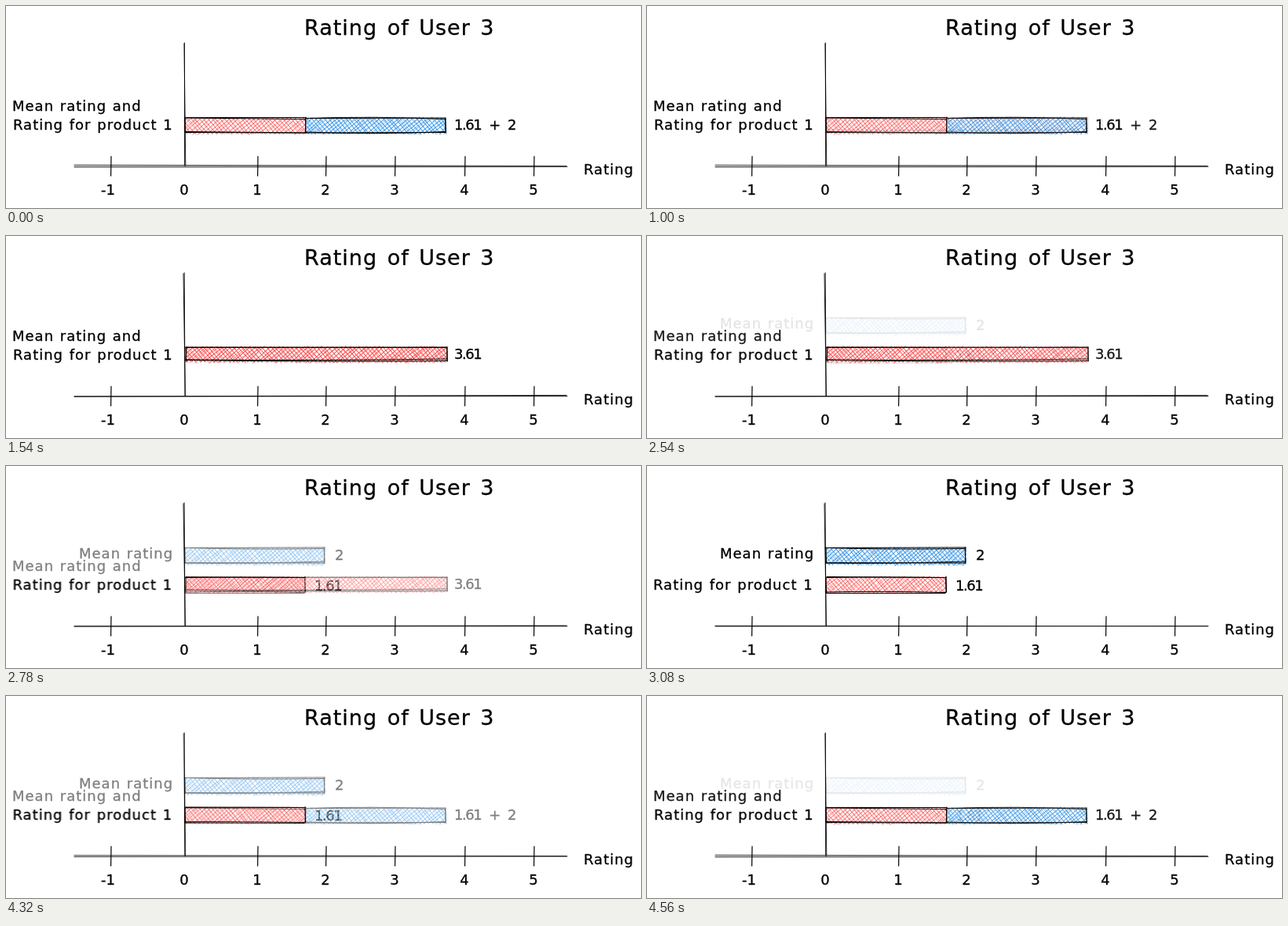
An HTML page with a canvas that plays this animation: 809 px wide and 258 px high, repeating every 4.62 s.

```html
<!DOCTYPE html>
<html lang="en">
<head>
<meta charset="utf-8">
<title>Rating of User 3</title>
<style>
  html, body { margin: 0; width: 100%; height: 100%; overflow: hidden; background: #fff; }
  canvas { display: block; }
</style>
</head>
<body>
<canvas id="stage" width="809" height="258"></canvas>
<script>
const WIDTH = 809, HEIGHT = 258;
const HOLD = 1000, STEP = 60, STEPS = 9, PERIOD = HOLD + STEP * STEPS;
const RED = '#fa5252', BLUE = '#228be6';

const TITLE = { size: 27, spacing: 1, words: 3 };
const LABEL = { size: 18, spacing: 1, words: 1 };
const VALUE = { size: 18, spacing: -1.5, words: 6 };
const TICK = { size: 18, spacing: 0, words: 0, align: 'center' };

const scenes = [
  {
    axes: 'M87 203.2L714 204.4M87 205.6L715 205.2M227 48L228.8 204M227.4 47L227.6 204',
    bars: [
      { box: [228, 143, 382, 163], color: RED, weight: 0.6 },
      { box: [382, 143, 560, 163], color: BLUE, weight: 0.65 }
    ],
    outline: 'M228 142.5L382 142.5M228 143L381 144.5M228 160.5L382 162M229 161.5L381 162' +
      'M228 142L228.5 161M382 142L381.4 162M381.4 143L382 162' +
      'M382 143.5Q470 140.5 560 144.5M382 143.5L560 143M560 143L560.4 162M559.6 144L560 161' +
      'M382 161Q470 164.5 560 160.5M382 162L560 161.5',
    labels: [['Mean rating and', 8, 134], ['Rating for product 1', 9, 158]],
    values: [['1.61 + 2', 571, 158]]
  },
  {
    axes: 'M87 205L714 203.4M87 205L715 204.6M226 48L228.4 204M227.2 47L228 204',
    bars: [{ box: [229, 142, 562, 161], color: RED, weight: 0.85 }],
    outline: 'M229 142.5L562 142M229 142L562 142.5M562 142L562.4 160M561.6 142L562 159' +
      'M229 158Q400 159.5 562 157M229 158.5Q390 161 562 159.5M229 142L229.5 160M230 142L229 159',
    labels: [['Mean rating and', 8, 134], ['Rating for product 1', 9, 158]],
    values: [['3.61', 571, 157]]
  },
  {
    axes: 'M87 204.2L714 204.6M87 204.8L715 204.4M226 48L228.4 204M227 47L228 204',
    bars: [
      { box: [228, 105, 406, 126], color: BLUE, weight: 0.65 },
      { box: [228, 142, 381, 162], color: RED, weight: 0.6 }
    ],
    outline: 'M227 104.5L406 104M228 104.5Q310 107 405 105.5M406 104L405.4 124M405 104L406 123' +
      'M228 123.5L406 124M228 124Q310 125 406 122M228 104L228.5 124' +
      'M229 141.5L381 142.5M229 142.5Q300 141.5 381 142.5M381 141L381.6 161M380.4 142L381 161' +
      'M228 161Q300 159.5 381 161.5M228 162.5L380 162.5M228 142L228.5 162',
    labels: [['Mean rating', 93, 118], ['Rating for product 1', 8, 158]],
    values: [['2', 419, 120], ['1.61', 393, 159]]
  }
];

const ticks = [[-1, 133], [0, 227], [1, 320], [2, 407], [3, 495], [4, 584], [5, 672]];

function randomFrom(seed) {
  return () => (seed = seed * 16807 % 2147483647) / 2147483647;
}

// The thin outline gives the letters the weight of a pen.
function write(g, [text, x, y], { size, spacing, words, align = 'left' }) {
  g.font = `${size}px "DejaVu Sans", sans-serif`;
  g.letterSpacing = spacing + 'px';
  g.wordSpacing = words + 'px';
  g.textAlign = align;
  g.strokeStyle = '#000';
  g.lineWidth = 0.3;
  g.fillText(text, x, y);
  g.strokeText(text, x, y);
}

function stroke(g, path, width = 1, color = '#000') {
  g.strokeStyle = color;
  g.lineWidth = width;
  g.stroke(new Path2D(path));
}

// Fills a bar with two crossing sets of uneven, doubled pen lines.
function hatch(g, { box: [left, top, right, bottom], color, weight }, random) {
  const jitter = v => v + (random() - 0.5) * 2.6;
  const height = bottom - top;
  let path = '';
  for (const [rising, run, gap] of [[true, height * 1.15, 6.1], [false, height * 0.87, 5.3]]) {
    for (let x = left - run + 3; x < right; x += gap) {
      const from = Math.max(0, (left - x) / run);
      const to = Math.min(1, (right - x) / run);
      const point = u => [
        jitter(x + run * u),
        jitter(rising ? bottom - height * u : top + height * u)
      ];
      for (let pass = 0; pass < 2; pass++) path += `M${point(from)}L${point(to)}`;
    }
  }
  stroke(g, path, weight, color);
}

function paint(scene, index) {
  const layer = document.createElement('canvas');
  layer.width = WIDTH;
  layer.height = HEIGHT;
  const g = layer.getContext('2d');
  const random = randomFrom(811 + index * 97);
  g.fillStyle = '#fff';
  g.fillRect(0, 0, WIDTH, HEIGHT);
  g.fillStyle = '#000';
  g.lineCap = g.lineJoin = 'round';

  scene.bars.forEach(bar => hatch(g, bar, random));
  stroke(g, scene.outline);
  stroke(g, scene.axes, 0.9);
  for (const [value, x] of ticks) {
    if (value) stroke(g, `M${x + 1} 192L${x + 0.6} 217`, 1.2);
    write(g, [value, value < 0 ? x - 3 : x, 241], TICK);
  }
  write(g, ['Rating of User 3', 380, 37], TITLE);
  write(g, ['Rating', 736, 215], LABEL);
  scene.labels.forEach(label => write(g, label, LABEL));
  scene.values.forEach(value => write(g, value, VALUE));
  return layer;
}

const layers = scenes.map(paint);
const stage = document.getElementById('stage').getContext('2d');
const start = performance.now();

function draw() {
  const time = Math.max(0, performance.now() - start) % (PERIOD * layers.length);
  const current = Math.floor(time / PERIOD);
  const fading = time % PERIOD - HOLD;
  stage.globalAlpha = 1;
  stage.drawImage(layers[current], 0, 0);
  if (fading >= 0) {
    stage.globalAlpha = (Math.floor(fading / STEP) + 1) / (STEPS + 1);
    stage.drawImage(layers[(current + 1) % layers.length], 0, 0);
  }
  requestAnimationFrame(draw);
}
draw();
</script>
</body>
</html>
```
